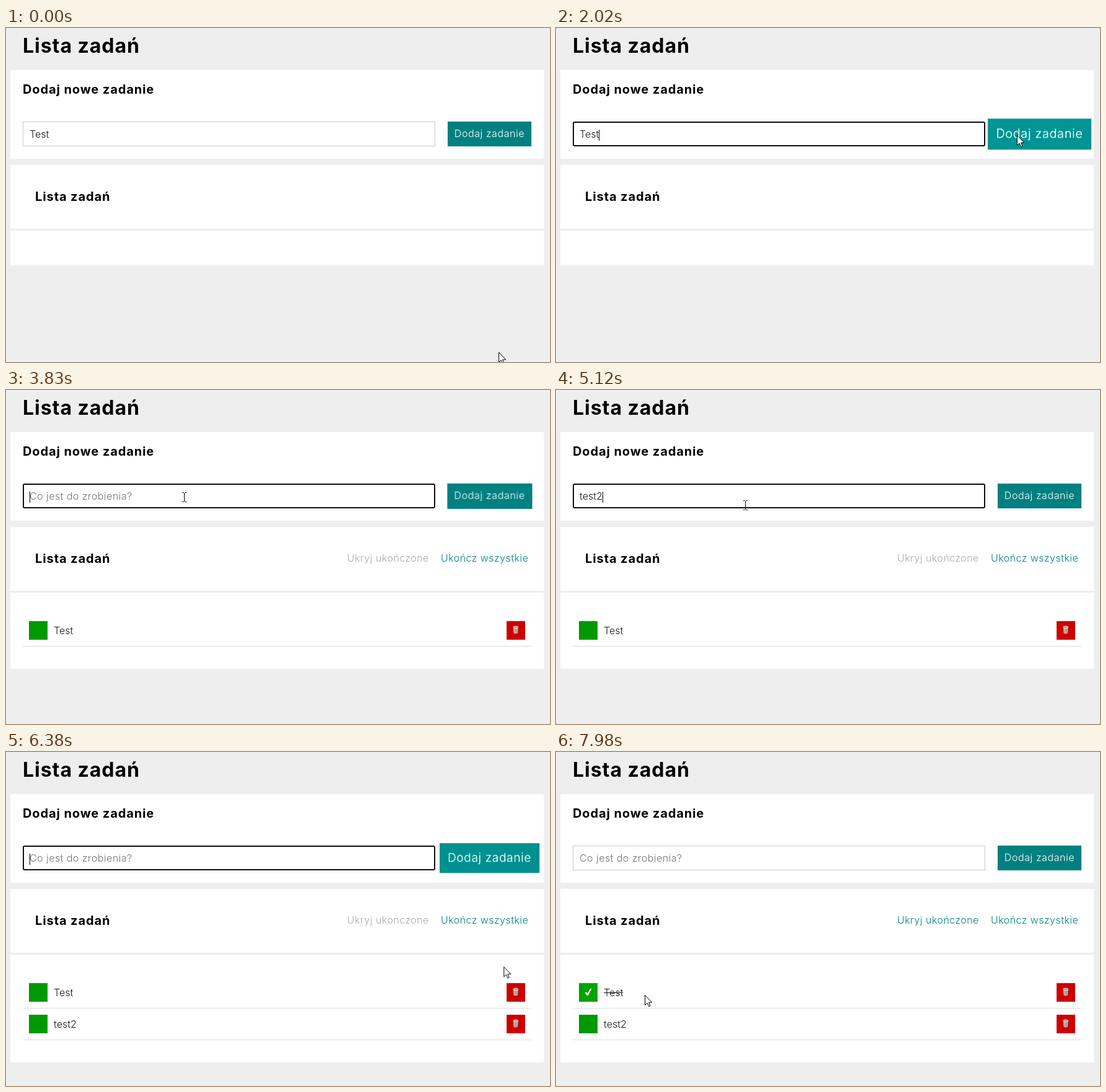
Write an HTML page that moves like this. It is 877 by 539 pixels and loops after 8000 ms.

```html
<!DOCTYPE html>
<html lang="pl">
<head>
<meta charset="utf-8">
<title>Lista zadań</title>
<style>
html, body { margin: 0; width: 100%; height: 100%; overflow: hidden; background: #eee; }
body { position: relative; font: 350 16px Inter, "Open Sans", sans-serif; letter-spacing: .028em; color: #1a1a1a; white-space: nowrap; }
body * { box-sizing: border-box; }
body > *, .row > * { position: absolute; }
h1, h2 { margin: 0; color: #000; font-weight: 700; }
h1 { left: 27px; top: 9px; font-size: 32px; line-height: 40px; letter-spacing: .03em; }
h2 { font-size: 20px; line-height: 24px; letter-spacing: .045em; }
.panel { left: 7px; width: 860px; background: #fff; }
.list { top: 327px; height: 56px; animation: grow 8s step-end infinite; }

.field { left: 27px; top: 151px; width: 665px; height: 40px; padding-left: 10px; border: 1px solid #ccc; line-height: 38px; }
.field.focus { outline: 2px solid #101010; outline-offset: -2px; border-radius: 3px; }
.value, .label { letter-spacing: 0; }
.hint { color: #757575; }
.caret { display: inline-block; width: 1px; height: 18px; margin-right: -1px; vertical-align: middle; background: #000; visibility: hidden; }

.add { left: 712px; top: 151px; width: 135px; height: 40px; line-height: 39px; text-align: center; letter-spacing: .035em; color: #fff; background: #008080; animation: hover 8s ease infinite; }
.link { top: 262px; line-height: 19px; color: #008080; animation: show-first 8s step-end infinite; }
.toggle { animation-name: show-first, enable; }

.row { left: 27px; width: 820px; height: 51px; border-bottom: 1px solid #ddd; line-height: 30px; }
.first { top: 363px; animation: show-first 8s step-end infinite; }
.second { top: 414px; animation: show-second 8s step-end infinite; }
.row > * { top: 10px; height: 30px; }
.row svg { width: 30px; }
.check { left: 10px; background: #009900; }
.label { left: 50px; }
.trash { left: 780px; background: #cc0000; }
.tick { animation: show-done 8s step-end infinite; }
.first .check { animation: done 8s step-end infinite; }
.first .label { animation: strike 8s step-end infinite; }

.cursor { left: 0; top: 0; width: 1px; height: 1px; overflow: visible; animation: travel 8s ease-in-out infinite; }
.arrow { animation: arrow 8s step-end infinite; }
.beam { animation: beam 8s step-end infinite; }

@keyframes grow { 0% { height: 56px } 28.75% { height: 123px } 75.6%, 100% { height: 174px } }
@keyframes show-first { 0% { visibility: hidden } 28.75%, 100% { visibility: visible } }
@keyframes show-second { 0% { visibility: hidden } 75.6%, 100% { visibility: visible } }
@keyframes show-done { 0% { visibility: hidden } 96.25%, 100% { visibility: visible } }
@keyframes done { 0% { background: #009900 } 96.25%, 100% { background: #00a300 } }
@keyframes strike { 0% { text-decoration: none } 96.25%, 100% { text-decoration: line-through } }
@keyframes enable { 0% { color: #aaa } 96.25%, 100% { color: #008080 } }
@keyframes hover {
  0%, 19.2%, 50.6%, 88.9%, 100% { transform: scale(1); filter: brightness(1); }
  31.7%, 38.1% { transform: scale(1.3); filter: brightness(1.2); }
  /* The pointer leaves before the second growth is complete. */
  68.9% { transform: scale(1); filter: brightness(1); animation-timing-function: cubic-bezier(.25, .15, .45, .85); }
  77.4% { transform: scale(1.277); filter: brightness(1.185); }
}
@keyframes travel {
  0%, .6% { transform: translate(794px, 523px); }
  5%, 13.6% { transform: translate(242px, 183px); animation-timing-function: ease-in; }
  19.25% { transform: translate(712px, 180px); animation-timing-function: ease-out; }
  22.5% { transform: translate(745px, 177px); }
  25.25%, 33% { transform: translate(743px, 173px); }
  36.5% { transform: translate(729px, 197px); animation-timing-function: linear; }
  38.75% { transform: translate(722px, 224px); }
  44.4% { transform: translate(300px, 178px); }
  47%, 48.2% { transform: translate(287px, 173px); }
  51.4%, 54.5% { transform: translate(305px, 184px); }
  62.25%, 64.2% { transform: translate(305px, 186px); animation-timing-function: ease-in; }
  68.9% { transform: translate(705px, 183px); animation-timing-function: ease-out; }
  71.25%, 75.6% { transform: translate(750px, 178px); animation-timing-function: ease-in; }
  77.4% { transform: translate(765px, 197px); animation-timing-function: linear; }
  79.75% { transform: translate(802px, 346px); animation-timing-function: ease-out; }
  83.1%, 84.5% { transform: translate(840px, 394px); }
  92.5%, 96.75% { transform: translate(55px, 388px); }
  99.6%, 100% { transform: translate(143px, 392px); }
}
@keyframes arrow {
  0%, 19%, 68.7%, 100% { visibility: visible }
  4.4%, 42.5% { visibility: hidden }
}
@keyframes beam {
  0%, 19%, 68.7%, 100% { visibility: hidden }
  4.4%, 42.5% { visibility: visible }
}
</style>
</head>
<body>
<svg width="0" height="0">
  <symbol id="trash" viewBox="0 0 30 30">
    <path d="M11 9.5 11.5 19.5q3 2 6.5 0l.5-10z" fill="#d9cfc4"/>
    <path d="M13.2 12v8M15 12v8M16.8 12v8" stroke="#8c6458" stroke-width=".8"/>
    <ellipse cx="14.7" cy="9.7" rx="3.9" ry="1.6" fill="#a08c80" stroke="#f2ece4"/>
  </symbol>
</svg>

<h1>Lista zadań</h1>
<div class="panel" style="top:68px;height:143px"></div>
<div class="panel" style="top:221px;height:103px"></div>
<div class="panel list"></div>
<h2 style="left:27px;top:87px">Dodaj nowe zadanie</h2>
<h2 style="left:47px;top:260px">Lista zadań</h2>

<div class="field"><span class="value">Test</span><span class="caret"></span><span class="hint"></span></div>
<div class="add">Dodaj zadanie</div>
<div class="link toggle" style="left:550px">Ukryj ukończone</div>
<div class="link" style="left:701px">Ukończ wszystkie</div>

<div class="row first">
  <svg class="check" viewBox="0 0 30 30"><path class="tick" d="M9.5 15.2 12 14.2 13.8 16.8 18 9H20.5L14.5 20.3H13Z" fill="#fff"/></svg>
  <span class="label">Test</span>
  <svg class="trash"><use href="#trash"/></svg>
</div>
<div class="row second">
  <svg class="check"></svg>
  <span class="label">test2</span>
  <svg class="trash"><use href="#trash"/></svg>
</div>

<svg class="cursor">
  <path class="arrow" d="M.5 .5V16.5L4.2 13 6.7 18.7 9 17.7 6.6 12.1H11.7Z" fill="#fff" stroke="#000"/>
  <path class="beam" d="M-3 -7.5H-.5M1.5 -7.5H4M.5 -7V7M-3 7.5H-.5M1.5 7.5H4" fill="none" stroke="#000"/>
</svg>

<script>
const LOOP = 8000, FOCUS = 640, BLUR = 7700, SUBMITS = [2300, 6050];
const TYPED = 'test2', KEYS = [4020, 4090, 4370, 4520, 4960];
const [field, value, caret, hint] =
  ['.field', '.value', '.caret', '.hint'].map(s => document.querySelector(s));
let start;

function draw(now) {
  start ??= now;
  const t = (now - start) % LOOP;
  const pressed = KEYS.filter(k => k <= t);
  const text = t < SUBMITS[0] ? 'Test' : t < SUBMITS[1] ? TYPED.slice(0, pressed.length) : '';
  const focused = t >= FOCUS && t < BLUR;
  // Each key press restarts the blink.
  const sinceKey = t - Math.max(FOCUS, ...pressed);

  value.textContent = text;
  hint.textContent = text ? '' : 'Co jest do zrobienia?';
  field.classList.toggle('focus', focused);
  caret.style.visibility = focused && sinceKey % 1000 < 500 ? 'visible' : 'hidden';
  requestAnimationFrame(draw);
}
requestAnimationFrame(draw);
</script>
</body>
</html>
```
